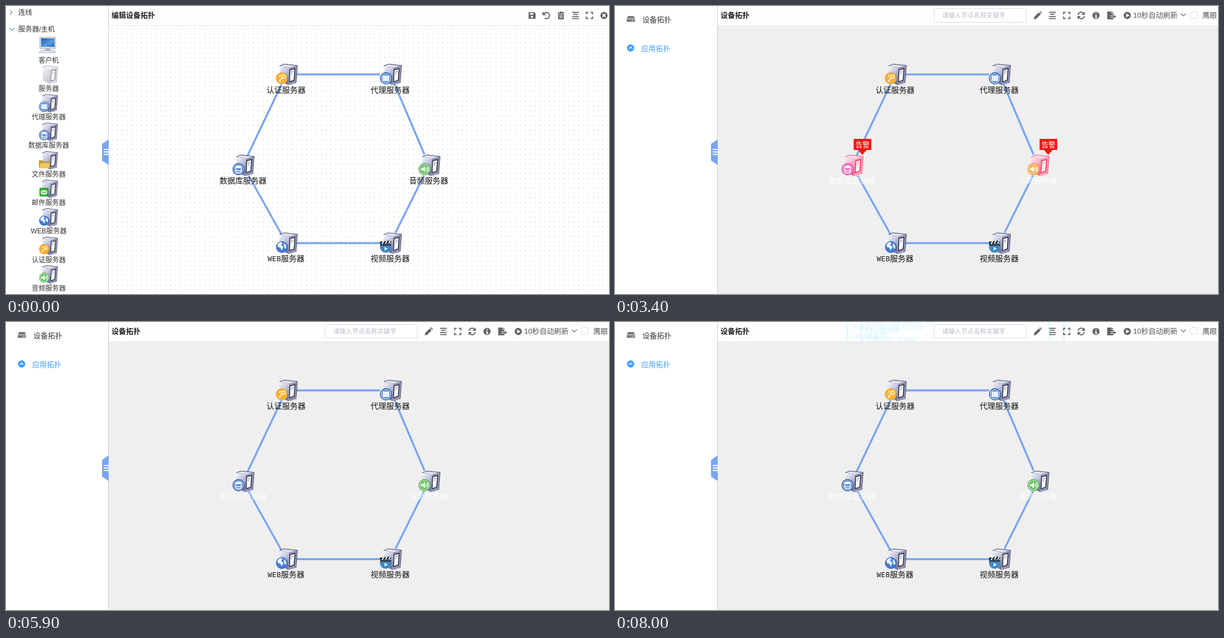
These frames come from a looping animation (1080x518 px, 8.4 s). An HTML page:

```html
<!DOCTYPE html>
<html lang="zh">
<head>
<meta charset="utf-8">
<style>
html, body { margin: 0; width: 100%; height: 100%; overflow: hidden; background: #fff; }
svg { display: block; width: 1080px; height: 518px; }
text { font-family: "Liberation Sans", "Noto Sans CJK SC", "Noto Sans CJK", sans-serif; white-space: pre; }
.ghost { opacity: .55; }
.ghost rect { fill: none; stroke: #d9f6ff; stroke-width: 4; }
.ghost path { display: none; }
.ghost text { fill: #c9f2ff; font-weight: bold; }
</style>
</head>
<body>
<svg id="stage" viewBox="0 0 1080 518">
  <defs>
    <pattern id="dots" x="190" y="40" width="8.7" height="8.7" patternUnits="userSpaceOnUse">
      <rect width="1" height="1" fill="#999"/>
    </pattern>
    <linearGradient id="steel" x2=".5" y2="1">
      <stop stop-color="#f8f9fe"/><stop offset=".5" stop-color="#c3c6de"/><stop offset="1" stop-color="#73779f"/>
    </linearGradient>
    <linearGradient id="rose" x2=".5" y2="1">
      <stop stop-color="#fff0f5"/><stop offset=".5" stop-color="#ffb3cb"/><stop offset="1" stop-color="#f5658f"/>
    </linearGradient>
    <linearGradient id="pale" x2=".6" y2="1">
      <stop stop-color="#fafafa"/><stop offset="1" stop-color="#c6c7ce"/>
    </linearGradient>
    <linearGradient id="screen" x2="1" y2="1">
      <stop stop-color="#1d5fae"/><stop offset=".6" stop-color="#5b9bdb"/><stop offset="1" stop-color="#2768b4"/>
    </linearGradient>
    <clipPath id="bar"><rect x="184" width="896" height="35"/></clipPath>
  </defs>
</svg>
<script>
const LOOP = 8400, BLUE = '#78a5f1', INK = '#666';

// y is the vertical middle of the line
const text = (x, y, s, size, fill = '#333', extra = '') =>
  `<text x="${x}" y="${y + size * .37}" font-size="${size}" fill="${fill}" ${extra}>${s}</text>`;
const mid = 'text-anchor="middle"', bold = 'font-weight="bold"';
const path = (d, fill, extra = '') => `<path d="${d}" fill="${fill}" ${extra}/>`;
const line = (d, color, w = 1.5, extra = '') => path(d, 'none', `stroke="${color}" stroke-width="${w}" ${extra}`);
const disc = (x, y, r, fill, extra = '') => `<circle cx="${x}" cy="${y}" r="${r}" fill="${fill}" ${extra}/>`;
const box = (x, y, w, h, fill, extra = '') => `<rect x="${x}" y="${y}" width="${w}" height="${h}" fill="${fill}" ${extra}/>`;
const group = (x, y, body, scale = 1) => `<g transform="translate(${x} ${y}) scale(${scale})">${body}</g>`;
const layer = (id, body, extra = '') => `<g id="${id}" ${extra}>${body}</g>`;

// --- server icons, drawn in a 46px box ---
const SKIN = {
  steel: ['#dfe1ee', '#8f93b6', '#2b2c3c', '#fff'],
  rose: ['#ffdce8', '#ff9fba', '#f0264e', '#fff0f3'],
  pale: ['#f4f4f6', '#d9dae0', '#85878f', '#fafafa']
};
function tower(skin) {
  const [top, side, frame, panel] = SKIN[skin];
  return path('M10.500 8L19 4.500L43 7L28 11.500Z', top, `stroke="${side}" stroke-width=".8"`) +
    path('M10.500 8L28 11.500L27 42.500L12 35Z', `url(#${skin})`) +
    path('M28 11.500L43 7L40.500 38.500L27 42.500Z', side) +
    path('M29.500 15L38.500 12.500L37 33.500L28.700 36.500Z', panel, `stroke="${frame}" stroke-width="1.500"`) +
    line('M31.500 19L36 18M31.500 22L34 21.500', frame, .7) +
    line('M11 7.500L19 4.500L43 7L40.500 38.500', frame, .7);
}
const ring = (fill, edge) => disc(15, 30, 10, '#f4f8ff', `stroke="${edge}" stroke-width="1.300"`) + disc(15, 30, 8.3, fill);
const cylinder = 'M10 26.500v7c0 3.500 10 3.500 10 0v-7M10 30c0 3.500 10 3.500 10 0';
const stack = (fill, edge) => ring(fill, edge) + '<ellipse cx="15" cy="26" rx="5.500" ry="2.500" fill="#fff"/>' + line(cylinder, '#fff', 1.6);
const speaker = (fill, edge) => ring(fill, edge) + path('M9 28h3l4-4v12l-4-4h-3Z', '#fff') +
  line('M18 27q2 3 0 6M20 25.500q3 4.500 0 9', '#fff', 1.3);
const BADGE = {
  none: '',
  auth: disc(15, 30, 10, '#fbb034', 'stroke="#ee9a1c" stroke-width="1.200"') + disc(18, 27, 3, 'none', 'stroke="#fff3c4" stroke-width="2"') +
    line('M16 29L9.500 35.500M11 34l2 2M10 27l3-3', '#fff3c4', 1.8),
  proxy: ring('#5b93e6', '#1b4a9c') + box(10, 26, 10, 8, '#e3eeff', 'stroke="#fff" stroke-width="1.500"'),
  db: stack('#4a82d8', '#1b4a9c'),
  dbAlarm: stack('#f45db4', '#e02b92'),
  audio: speaker('#63c45a', '#4bab49'),
  audioAlarm: speaker('#ffae45', '#f08c24'),
  web: disc(15, 30, 10, '#3f7edb', 'stroke="#2a5fb4"') + path('M7 26q5-7 9-4l-2 5l4 2l-3 7l-3-5l-4-1ZM18 23q6 3 5 9l-3 1l-1-5Z', '#eef4ff'),
  file: path('M4 23h8l2 3h12v14H4Z', '#c79a2e') + path('M7 29h21l-4 11H4Z', '#eec75c'),
  mail: box(5, 21, 19, 18, '#2fa62f', 'rx="3"') + box(8, 26, 13, 9, '#fff') + line('M8 26l6.500 5l6.500-5M8 35l4.500-5M21 35l-4.500-5', '#2fa62f', 1.2),
  video: disc(14.5, 30, 10.3, '#3d89c6') + path('M12.500 29.500v7l6-3.500Z', '#d6efff') +
    path('M4 20.500L24 18V22.500L5 25Z', '#222') + line('M8 24.500l3-5M14 23.500l3-5M20 23l3-5', '#fff', 2) + box(4.500, 25, 20, 2.500, '#333')
};
const server = (badge, skin = 'steel') => tower(skin) + BADGE[badge];
const computer = box(6, 4, 33, 24, '#dfe3ea', 'rx="1" stroke="#9aa3b0"') + box(8.500, 6.500, 28, 18, 'url(#screen)') +
  path('M18 28h9l2 4H16Z', '#aab0ba') + path('M7 32h30l2 5H4Z', '#dfe2e8', 'stroke="#a3a8b2" stroke-width=".8"');

// --- toolbar icons, centred on 0,0 ---
const ICON = {
  save: path('M-6-6H4L6.500-3.500V6H-6Z', INK) + box(-3.500, -4.500, 6, 3, '#fff') + disc(0, 2.500, 2, '#fff'),
  undo: line('M-4.500-3A5.500 5.500 0 1 1-3.500 4.500', INK, 2) + path('M-7-7V-.500H-.500Z', INK),
  trash: box(-6, -5.500, 12, 2, INK) + box(-2, -7, 4, 2, INK) + path('M-5-2.500H5V7H-5Z', INK) + line('M-2-1V5M0-1V5M2-1V5', '#fff', .9),
  align: line('M-6-5.500H6M-4-1.800H4M-6 1.900H6M-6 5.600H6', INK, 1.8),
  expand: line('M-5.500-2V-5.500H-2M2-5.500H5.500V-2M5.500 2V5.500H2M-2 5.500H-5.500V2', INK, 2),
  close: disc(0, 0, 6.500, INK) + line('M-2.500-2.500L2.500 2.500M2.500-2.500L-2.500 2.500', '#fff', 2),
  pencil: path('M-7 7L-6 2.500L2-5.500L5.500-2L-2.500 6Z', INK) + path('M3-6.500L4.500-7.500L7.500-4.500L6.500-3Z', INK),
  refresh: line('M-5.500-1A5.500 5.500 0 0 1 4.500-3.500M5.500 1A5.500 5.500 0 0 1-4.500 3.500', INK, 2) + path('M6.500-7V-1H.500ZM-6.500 7V1H-.500Z', INK),
  info: disc(0, 0, 6.500, INK) + line('M0-4.500V-2.500M0-1V4M-1.500 3.800H2', '#fff', 2),
  leave: path('M-7-7H1V-3H4V7H-7Z', INK) + path('M2-7L5-4H2Z', INK) + line('M-1 2H6', '#fff', 4) + line('M-1 2H6', INK, 2) + path('M5-1.500L9 2L5 5.500Z', INK),
  play: disc(0, 0, 6.500, INK) + path('M-2-3.500V3.500L4 0Z', '#fff')
};
const tools = list => list.map(([name, x]) => group(x, 17, ICON[name])).join('');

// --- shared frame ---
const handle = path('M184 240L172 248V278L184 286Z', BLUE) + line('M175 258H184M175 262.500H184M175 267H184', '#fff', 1.8);
const frame = box(0, 0, 184, 518, '#fff') + line('M183.500 0V518', '#ccc', 1) + handle;
const header = title => box(184, 0, 896, 35, '#fefefe') + line('M184 35.500H1080', '#d6d6d6', 1, 'stroke-dasharray="3 2"') +
  text(189, 16, title, 13, '#222', bold);

// --- editor ---
const palette = [['客户机'], ['服务器', 'none', 'pale'], ['代理服务器', 'proxy'], ['数据库服务器', 'db'], ['文件服务器', 'file'],
  ['邮件服务器', 'mail'], ['WEB服务器', 'web'], ['认证服务器', 'auth'], ['音频服务器', 'audio']];
const editor = frame +
  line('M7 7.500L11 11.500L7 15.500', '#888', 1.1) + text(22, 11.500, '连线', 12.4) +
  line('M6 39.500L10.500 44L15 39.500', '#5b9bc0', 1.1) + text(22, 41, '服务器/主机', 12.4) +
  palette.map(([name, badge, skin], i) => {
    const y = 97 + i * 51.3;
    return group(55.5, y - 44.5, badge ? server(badge, skin) : computer, .86) + text(76.5, y, name, 12.2, '#333', mid);
  }).join('') +
  header('编辑设备拓扑') +
  tools([['save', 942], ['undo', 968], ['trash', 994], ['align', 1020], ['expand', 1045], ['close', 1071]]);

// --- tooltips ---
const BLANK = ['*节点IP: undefined', '*CPU使用率', '空闲CPU: -', '内核CPU占用: -|用户CPU占用: -', '*内存使用率', '内存总量: -|已用内存: -',
  '*存储空间', '总磁盘空间: -|已用空间: -', '每秒读取: -|每秒写入: -', '*网络端口', '进流量: -|进包数: -', '进丢包数: -|进错误包数: -',
  '出流量: -|出包数: -', '出丢包数: -|出错误包数: -', '*进程状态', 'Top1进程名: -|该进程消耗CPU: -',
  '该进程消耗内存: -|该进程打开文件描述符数: -', '该主机上总进程数: -', '*最近刷新时间: 2018-08-23 17:53:58'];
const VALUES = ['192.168.10.201', '7.46%', '0.07%', '0.30%', '15.63GB', '87.48%', '137.38GB', '9.63%', '0bytes', '1527140bytes',
  '0.00MB/s', '0', '0', '0', '0.00MB/s', '0', '0', '0', 'python', '14.92%', '1.55%', '30', '181'];
let next = 0;
const FILLED = BLANK.map(row => row.replace(/: (-|undefined)/g, () => ': ' + VALUES[next++]));

function tip(x, y, w, title, rows) {
  const lines = rows.map((row, i) => {
    const strong = row[0] === '*', cy = 35.5 + i * 15.88;
    return row.replace('*', '').split('|').map((s, col) =>
      text(7 + col * 195, cy, s, 12.15, s.includes('87.48') ? '#f56c6c' : strong ? '#444' : '#555', strong ? bold : '')).join('');
  });
  const shade = line(`M${w + 1} 1V340H1`, '#777', 1.5, 'opacity=".7"') + line(`M${w + 2.3} 2V341.300H2`, '#777', 1.2, 'opacity=".25"');
  return group(x, y, shade + box(0, 0, w, 339, '#fff', 'fill-opacity=".83" stroke="#a5a5a5"') +
    text(w / 2, 18, title, 14.8, '#333', mid) + lines.join(''));
}
const dbTip = tip(441.5, -35.5, 362.5, '数据库服务器', FILLED);
const lowTip = tip(416, -25.5, 362.5, '数据库服务器', FILLED);
const ghost = (id, body) => layer(id, `<g class="ghost">${body}</g>`, 'clip-path="url(#bar)"');

// --- viewer ---
const viewer = frame +
  path('M23.500 18H33.500L36 22.500H21Z', '#777') + box(21, 23.500, 15, 5, '#777', 'rx="1"') + line('M30 26h1.500M33 26h1.500', '#fff', 1.3) +
  text(49, 24, '设备拓扑', 13) +
  disc(28, 75.5, 6.5, '#409eff') + line('M25 77L28 73.500L31 77', '#fff', 1.2) + text(47, 76.5, '应用拓扑', 13, '#409eff') +
  header('设备拓扑') + ghost('ghost1', dbTip) + ghost('ghost2', lowTip) +
  box(571.5, 4.5, 165, 25, '#fff', 'rx="3" stroke="#d8dce5"') + text(586, 16.5, '请输入节点名称关键字', 11.3, '#b8bcc6') +
  tools([['pencil', 757], ['align', 783.5], ['expand', 809], ['refresh', 835], ['info', 861.5], ['leave', 888.5], ['play', 917.5]]) +
  text(928, 16, '10秒自动刷新', 13, '#555') + line('M1013.500 13.500L1018 18L1022.500 13.500', '#666', 1.1) +
  box(1030.5, 10, 12, 12, '#fff', 'rx="1.500" stroke="#d8dce5"') + text(1052, 16, '鹰眼', 13, '#555');

// --- topology ---
const links = line('M520 123H670M696 141L749.500 267M493.500 141L432.300 270M434.500 305L493 410M520 426.500H672M748.500 305L697.500 408', BLUE, 3.5);
const select = (id, x, y) => layer(id, box(x, y, 46, 46, '#7db4f5', 'fill-opacity=".5"'));
const label = (x, y, s, fill = '#111') =>
  text(x, y, s.replace('WEB', '<tspan font-family="Noto Sans Mono, monospace" font-size="13.300">WEB</tspan>'), 14, fill, mid);
const node = (x, y, badge, name) => group(x, y, server(badge)) + label(x + 22.5, y + 50.5, name);
const flag = (x, y) => path(`M${x} ${y}h31.500v20h-8.500l-7.500 9l-7.500-9h-8Z`, '#fb1212') + text(x + 15.75, y + 10, '告警', 12.6, '#fff', mid);
function alarmNode(x, y, badge, name, lx) {
  return `<g class="calm">${group(x, y, server(badge))}</g>` +
    `<g class="alarm">${group(x, y, server(badge + 'Alarm', 'rose'))}${flag(x + 26, y - 24.5)}</g>` +
    `<g class="plain">${label(lx, y + 50.5, name)}</g><g class="white">${label(lx, y + 50.5, name, '#fcfdff')}</g>`;
}
const topology = links + select('pickAuth', 479, 100) + select('pickDb', 401.5, 263.5) +
  node(479, 100, 'auth', '认证服务器') + node(665.5, 100, 'proxy', '代理服务器') +
  alarmNode(401.5, 263.5, 'db', '数据库服务器', 424.5) + alarmNode(734.5, 263.5, 'audio', '音频服务器', 757) +
  node(479, 403.5, 'web', 'WEB服务器') + node(665.5, 403.5, 'video', '视频服务器');

document.getElementById('stage').insertAdjacentHTML('beforeend',
  layer('grid', box(184, 36, 896, 482, '#fff') + box(184, 36, 896, 482, 'url(#dots)', 'shape-rendering="crispEdges"')) +
  layer('grey', box(184, 36, 896, 482, '#efefef')) + layer('topology', topology) +
  layer('editor', editor) + layer('viewer', viewer) +
  layer('tipAuth', tip(520, 128, 353.5, '认证服务器', BLANK)) + layer('tipDb', dbTip) + layer('tipLow', lowTip));

// --- timeline: start, end pairs in ms when each part is visible ---
const alarms = [3200, 3900, 4500, 4900, 5400, 5900, 6400, 6900, 7500, 7800];
const SHOW = {
  '#grid, #editor': [0, 2500],
  '#grey, #viewer': [2500, LOOP],
  '#topology': [0, 2500, 2600, LOOP],
  '#pickAuth': [400, 900, 4300, 5200],
  '#pickDb': [6000, 6900],
  '#tipAuth': [4300, 5100],
  '#tipDb': [6000, 6800],
  '#tipLow': [7600, 7900],
  '#ghost1': [6800, LOOP],
  '#ghost2': [7900, LOOP],
  '.plain': [0, 3200],
  '.white': [3200, LOOP],
  '.alarm': alarms,
  '.calm': [0, ...alarms, LOOP]
};
const parts = Object.entries(SHOW).map(([sel, times]) => [[...document.querySelectorAll(sel)], times]);
const start = performance.now();
function draw(now) {
  const t = Math.max(0, now - start) % LOOP;
  for (const [els, times] of parts) {
    const on = times.filter(x => x <= t).length % 2;
    for (const el of els) el.style.display = on ? '' : 'none';
  }
  requestAnimationFrame(draw);
}
draw(start);
</script>
</body>
</html>
```
